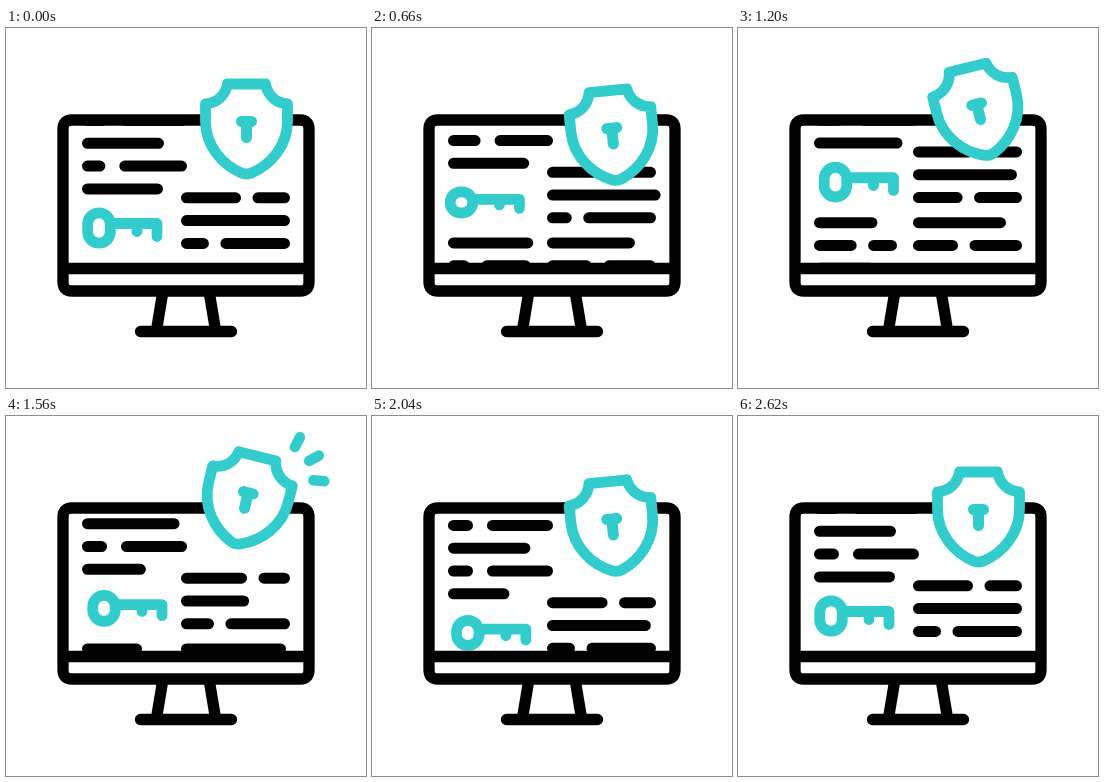
These frames come from a looping animation (360 px wide and 360 px high, 3 s). An HTML page with a canvas:

```html
<!DOCTYPE html>
<html lang="en">
<head>
<meta charset="utf-8">
<title>Secure screen</title>
<style>
html, body { margin: 0; width: 100%; height: 100%; overflow: hidden; background: #fff; }
canvas { display: block; }
</style>
</head>
<body>
<canvas id="stage" width="360" height="360"></canvas>
<script>
const ctx = document.getElementById('stage').getContext('2d');
const LOOP = 3000, BEGIN = 220, END = 2620;
const BLACK = '#000', TEAL = '#33cccc', PITCH = 22.8;

const ease = (t, from, to) => {
  const u = Math.max(0, Math.min(1, (t - from) / (to - from)));
  return u * u * (3 - 2 * u);
};

// Eased moves from rest to each [time, value] stop, then back to rest
function travel(t, rest, ...stops) {
  let value = rest, from = BEGIN, last = rest;
  for (const [time, next] of [...stops, [END, rest]]) {
    value += (next - last) * ease(t, from, time);
    [from, last] = [time, next];
  }
  return value;
}

const hump = (t, peak) => Math.cos(Math.PI / 2 * Math.min(1, Math.abs(t - peak) / 600)) ** 2;

// A row swings once, after a slight move the other way
const swinging = (t, swing, peak) => swing * (hump(t, peak) - hump(t, peak - 600) / 4);

// Solid rows move their end, split rows move their gap
const BLOCKS = [
  { x: 76, y: 92.5, space: 14, rows: [
    { split: 101, end: 181 },
    { end: 158, swing: 16, peak: 1500 },
    { split: 101, end: 181, swing: 12, peak: 880 },
    { end: 157, swing: -30, peak: 1800 }
  ] },
  { x: 76, y: 240.5, space: 11.5, rows: [
    { end: 156, swing: -24, peak: 1400 },
    { split: 102, end: 159, swing: 17, peak: 1250 },
    { end: 138 }
  ] },
  { x: 175, y: 169.8, space: 11.5, rows: [
    { split: 235, end: 284, swing: 6, peak: 1560 },
    { end: 284, swing: -41, peak: 1580 },
    { split: 203, end: 284, swing: 22, peak: 1150 }
  ] },
  { x: 175, y: 240.5, space: 11.5, rows: [
    { end: 280, swing: -27, peak: 880 },
    { split: 220, end: 284 }
  ] }
];

const monitor = new Path2D(`M66 92H294Q303 92 303 101V254Q303 263 294 263H66Q57 263 57 254V101Q57 92 66 92Z
  M57 240.5H303 M156.5 266L150.5 302 M203.5 266L209.5 302 M134.5 303.5H225.5`);
const shieldBody = new Path2D(`M-19 -45H19C21 -34 29 -26 41 -25V-8C41 17 24 36 5 44
  Q0 46 -5 44C-24 36 -41 17 -41 -8V-25C-29 -26 -21 -34 -19 -45Z`);
const keyhole = new Path2D('M-5 -7.5H5M0 -7V8.5');

function stroke(path, color, width) {
  ctx.strokeStyle = color;
  ctx.lineWidth = width;
  ctx.stroke(path);
}

function drawRows(t) {
  const path = new Path2D();
  const dash = (from, to, y) => { path.moveTo(from + 5.5, y); path.lineTo(to - 5.5, y); };
  for (const block of BLOCKS) {
    block.rows.forEach(({ split, end, swing = 0, peak = 0 }, i) => {
      const y = block.y + i * PITCH, shift = swinging(t, swing, peak);
      if (split) {
        dash(block.x, split + shift, y);
        dash(split + shift + block.space, end, y);
      } else {
        dash(block.x, end + shift, y);
      }
    });
  }
  stroke(path, BLACK, 11);
}

function drawKey(t) {
  const tall = travel(t, 1, [800, 0.64], [1220, 0.98], [1800, 0.78]);
  const shaft = -4.5 * tall;
  const path = new Path2D();
  path.roundRect(-11.3, -15.2 * tall, 22.6, 30.4 * tall, 11.3);
  path.moveTo(14, shaft);
  path.lineTo(58, shaft);
  path.lineTo(58, 8.5 * tall);
  path.moveTo(38, shaft);
  path.lineTo(38, 3.5 * tall);
  ctx.save();
  ctx.translate(travel(t, 93, [900, 88], [1250, 98], [1560, 98]), 200);
  stroke(path, TEAL, 10.8);
  ctx.restore();
}

// Three short rays fanning out from the shield's right shoulder
function drawSparks(t) {
  const near = 34 + 11 * ease(t, 1760, 1920), far = 34 + 11 * ease(t, 1380, 1520);
  if (far <= near) return;
  const path = new Path2D();
  for (const degrees of [-77, -43, -9]) {
    const angle = degrees * Math.PI / 180;
    const point = r => [26.5 + r * Math.cos(angle), -30 + r * Math.sin(angle)];
    path.moveTo(...point(near));
    path.lineTo(...point(far));
  }
  stroke(path, TEAL, Math.min(10.5, 4 * (far - near)));
}

function drawShield(t) {
  ctx.save();
  ctx.translate(240.5, travel(t, 101, [560, 109], [1280, 82.5], [1480, 82.5], [2040, 110.5]));
  ctx.rotate(travel(t, 0, [1220, -14], [1540, 14], [1600, 14], [2060, -6]) * Math.PI / 180);
  ctx.fillStyle = '#fff';
  ctx.fill(shieldBody);
  stroke(shieldBody, TEAL, 10.8);
  stroke(keyhole, TEAL, 11);
  drawSparks(t);
  ctx.restore();
}

function draw(t) {
  ctx.clearRect(0, 0, 360, 360);
  ctx.lineCap = ctx.lineJoin = 'round';
  ctx.save();
  ctx.beginPath();
  ctx.rect(57, 92, 246, 148);
  ctx.clip();
  ctx.translate(0, travel(t, 0, [1060, -47.5], [1130, -47.5], [1890, 19]));
  drawRows(t);
  drawKey(t);
  ctx.restore();
  stroke(monitor, BLACK, 11.3);
  drawShield(t);
}

const start = performance.now();
function tick() {
  draw((performance.now() - start) % LOOP);
  requestAnimationFrame(tick);
}
tick();
</script>
</body>
</html>
```
